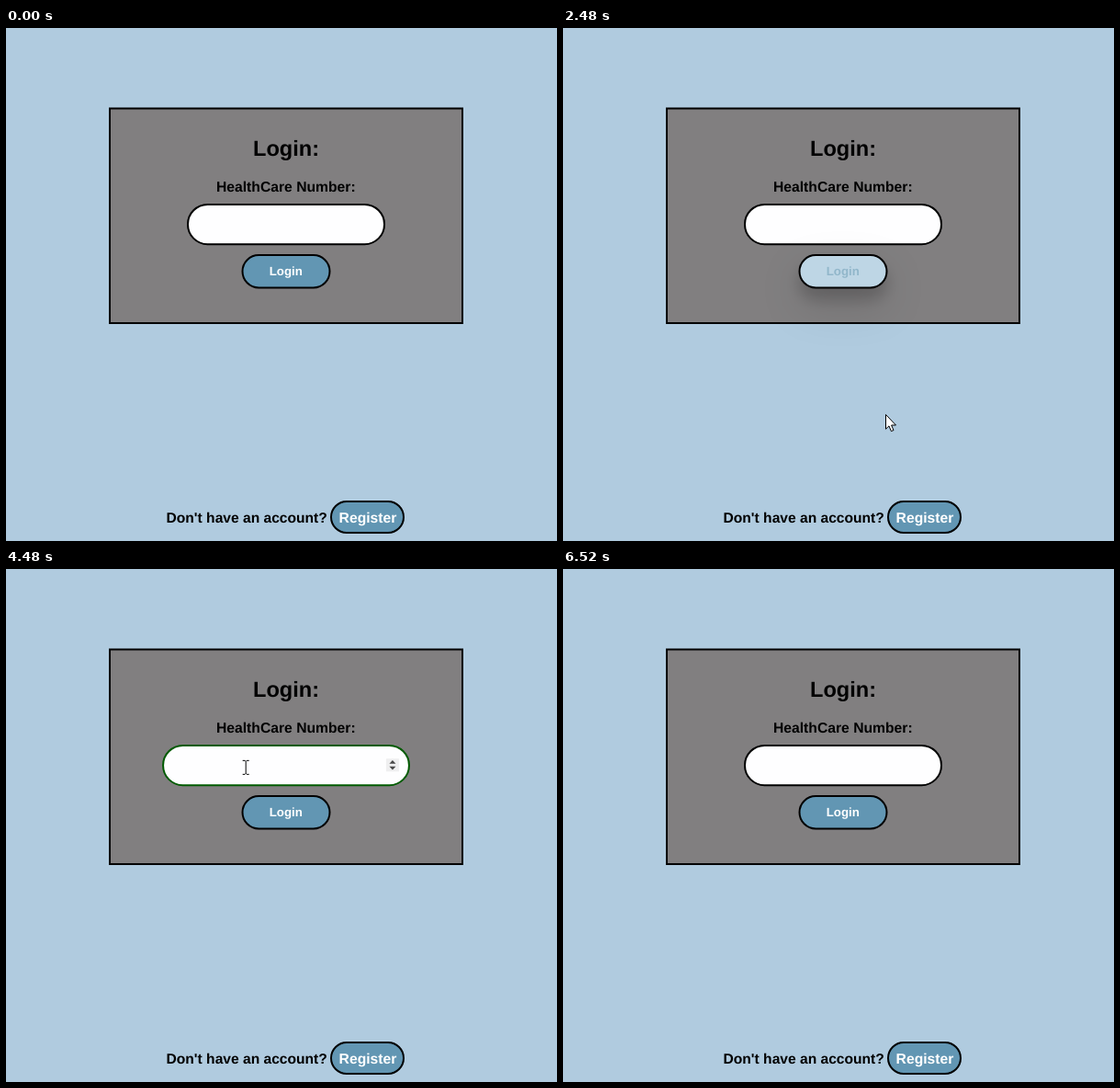
Write an HTML page that moves like this. It is 600 px wide and 558 px high and loops after 6.6 s.

```html
<!DOCTYPE html>
<html lang="en">
<head>
<meta charset="utf-8">
<title>Login</title>
<style>
  html, body { margin: 0; width: 100%; height: 100%; overflow: hidden; background: #b0cbdf; }
  svg { display: block; width: 100%; height: 100%; }
  text {
    font: bold 16px "Liberation Sans", Arial, sans-serif;
    text-anchor: middle;
    text-rendering: geometricPrecision;
  }
  .box { stroke: #000; stroke-width: 2; }
  .button .box {
    filter: drop-shadow(0 12px 8px rgb(0 0 0 / calc(.25 * var(--hover))))
            drop-shadow(0 17px 22px rgb(0 0 0 / calc(.17 * var(--hover))));
  }
  #title { font-size: 23.6px; }
  #label { font-size: 15.7px; }
  #question { font-size: 15.6px; }
  #login text { font-size: 13.3px; }
  #register text { font-size: 15.7px; }
  #cursor path { fill: #fff; stroke: #000; }
</style>
</head>
<body>
<svg viewBox="0 0 600 558">
  <rect width="600" height="558" fill="#b0cbdf"/>
  <rect class="box" x="113" y="87.5" width="384" height="233.5" fill="#817f80"/>
  <text id="title" x="305" y="139">Login:</text>
  <text id="label" x="304.8" y="177.5">HealthCare Number:</text>

  <rect id="field" class="box" y="192" height="43.2" rx="21.5" fill="#fefeff"/>
  <g id="spinner">
    <rect x="-7" y="-7" width="14" height="14" fill="#efeff0"/>
    <path d="M-3.5-1.5 0-5.2 3.5-1.5ZM-3.5 1.5 0 5.2 3.5 1.5Z" fill="#484848"/>
  </g>

  <g id="login" class="button">
    <rect class="box" x="257.5" y="247" width="95" height="35.5" rx="17.75"/>
    <text x="304.8" y="269.3">Login</text>
  </g>

  <text id="question" x="262.2" y="537.5">Don't have an account?</text>
  <g id="register" class="button">
    <rect class="box" x="354" y="515" width="79" height="34" rx="17"/>
    <text x="394" y="537.5">Register</text>
  </g>

  <g id="cursor">
    <path id="arrow" d="M.5.5V16.2L4 12.9 6.4 18.6 9 17.5 6.6 12H11.5Z"/>
    <path id="hand" d="M-1.6 13V1.8Q0-1 1.6 1.8V8Q4 6.6 4.8 8.6 7 7.4 8 9.6 11 8.8 11.2 11.4V16L9.2 22.5H.4L-4.8 14Q-5.4 11.6-1.6 13Z"/>
    <path id="beam" d="M-3.5-7.5H-1L0-6.5 1-7.5H3.5M0-6.5V6.5M-3.5 7.5H-1L0 6.5 1 7.5H3.5" style="fill:none"/>
  </g>
</svg>
<script>
const LOOP = 6600, STEP = 40, FADE = 440;
const CENTER = 305, MIDDLE = 213.3;
const BLACK = [0, 0, 0], GREEN = [0, 128, 0], WHITE = [255, 255, 255];
const BLUE = [98, 150, 179], PALE = [229, 242, 250];

// Points the pointer glides through
const stops = [
  { t: 960, x: 190, y: 562 },
  { t: 1480, x: 216, y: 334 },
  { t: 2240, x: 305, y: 270 },
  { t: 2480, x: 351, y: 420 },
  { t: 3120, x: 397, y: 528 },
  { t: 3680, x: 226, y: 310 },
  { t: 3920, x: 278, y: 234 },
  { t: 4440, x: 262, y: 215 },
  { t: 5080, x: 253, y: 259 },
  { t: 6440, x: 225, y: 562 }
];

const byId = id => document.getElementById(id);
const mix = (a, b, k) => a + (b - a) * k;
const blend = (a, b, k) => `rgb(${a.map((v, i) => Math.round(mix(v, b[i], k)))})`;
const within = (t, from, to) => t >= from && t < to;
const show = (id, on) => byId(id).style.display = on ? '' : 'none';
const place = (id, x, y) => byId(id).setAttribute('transform', `translate(${x} ${y})`);

function ease(p) {
  p = Math.max(0, Math.min(1, p));
  return p * p * (3 - 2 * p);
}
const pulse = (t, from, to) => ease((t - from) / FADE) - ease((t - to) / FADE);

// Cubic Hermite curve with slopes taken from the neighbouring stops
function glide(i, t, axis) {
  const a = stops[i], b = stops[i + 1], span = b.t - a.t, k = (t - a.t) / span;
  const slope = j => {
    const p = stops[Math.max(0, j - 1)], q = stops[Math.min(stops.length - 1, j + 1)];
    return (q[axis] - p[axis]) / (q.t - p.t) * span;
  };
  return mix(a[axis], b[axis], ease(k))
    + k * (1 - k) * ((1 - k) * slope(i) - k * slope(i + 1));
}

function contains(rect, x, y) {
  const b = rect.getBBox();
  return within(x, b.x, b.x + b.width) && within(y, b.y, b.y + b.height);
}

function paintButton(id, hover) {
  const [face, label] = byId(id).children;
  byId(id).style.setProperty('--hover', hover);
  face.style.fill = blend(BLUE, PALE, hover);
  label.style.fill = blend(WHITE, BLUE, hover);
}

function paintField(t) {
  const focus = pulse(t, 4200, 5400), half = mix(107, 145.5, focus);
  const field = byId('field');
  field.setAttribute('x', CENTER - half);
  field.setAttribute('width', 2 * half);
  field.style.stroke = blend(BLACK, GREEN, focus);
  show('spinner', within(t, 3920, 5400));
  place('spinner', CENTER + half - 18, MIDDLE);
}

function paintCursor(t) {
  const i = stops.findIndex((stop, j) => j < stops.length - 1 && within(t, stop.t, stops[j + 1].t));
  show('cursor', i >= 0);
  if (i < 0) return;
  const x = glide(i, t, 'x'), y = glide(i, t, 'y');
  const hand = ['login', 'register'].some(id => contains(byId(id).firstElementChild, x, y));
  const beam = contains(byId('field'), x, y);
  place('cursor', x, y);
  show('hand', hand);
  show('beam', beam);
  show('arrow', !hand && !beam);
}

function render(t) {
  paintButton('login', pulse(t, 1920, 2320));
  paintButton('register', pulse(t, 2640, 3300));
  paintField(t);
  paintCursor(t);
}

let start;
function tick(now) {
  start ??= now;
  render(Math.floor(((now - start) % LOOP) / STEP) * STEP);
  requestAnimationFrame(tick);
}
render(0);
requestAnimationFrame(tick);
</script>
</body>
</html>
```
